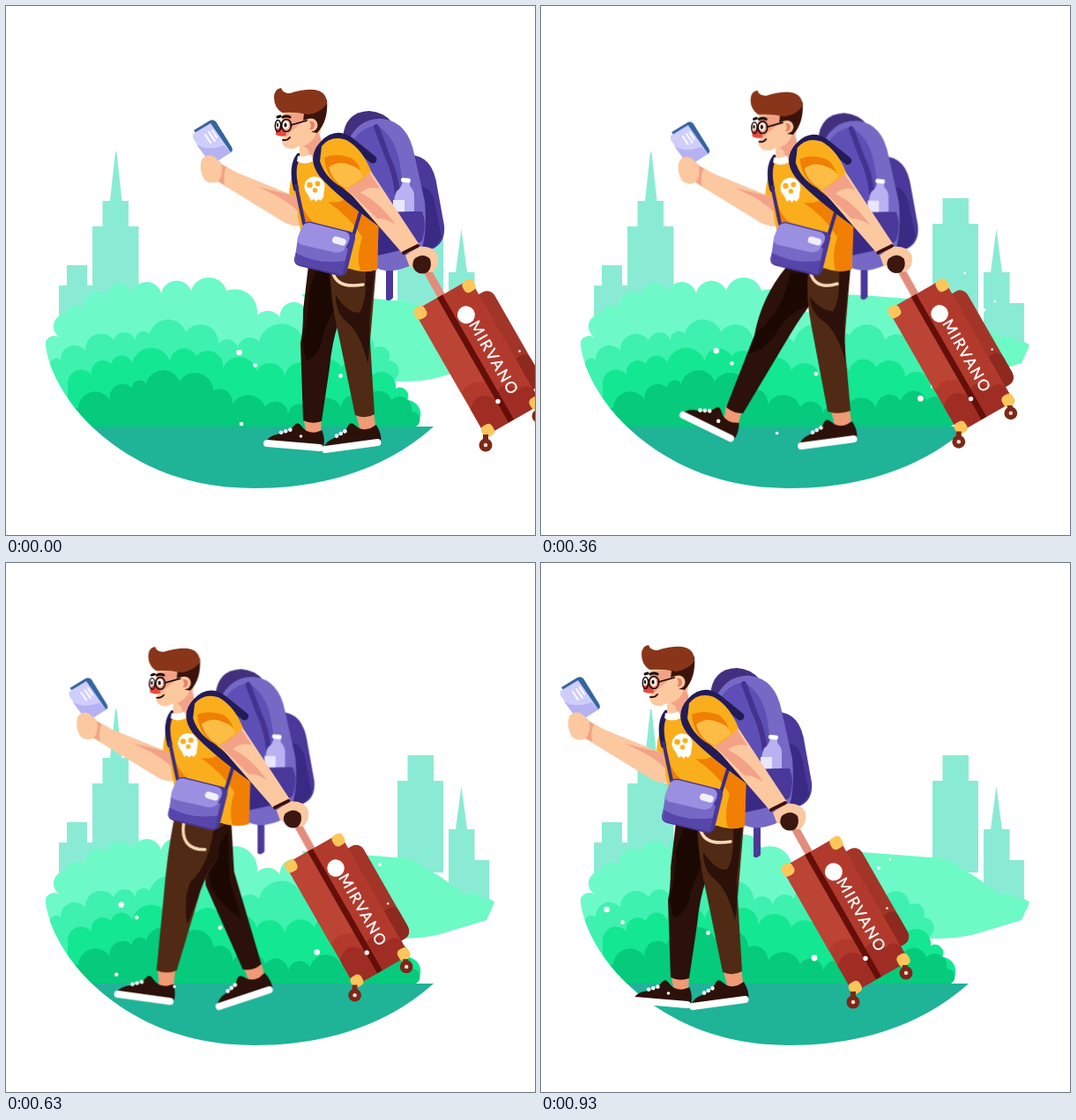
These frames come from a looping animation (600x600 px, 960 ms). An HTML page:

```html
<!DOCTYPE html>
<html lang="en">
<head>
<meta charset="utf-8">
<title>Traveller</title>
<style>
html, body { margin: 0; width: 100%; height: 100%; overflow: hidden; background: #fff; }
svg { display: block; width: 100vw; height: 100vh; }
.walker { animation: walk 960ms infinite; }
.stand, .stepB, .stepC { animation: stand 960ms step-end infinite; }
.stepB { animation-name: stepB; }
.stepC { animation-name: stepC; }
@keyframes walk {
  0% { transform: translate(0, 0) scale(1); animation-timing-function: steps(8); }
  24.999% { transform: translate(-43.8px, 0) scale(1); animation-timing-function: step-end; }
  25% { transform: translate(-39.6px, 4.3px) scale(.984); animation-timing-function: steps(8); }
  49.999% { transform: translate(-83.4px, 4.3px) scale(.984); animation-timing-function: step-end; }
  50% { transform: translate(-108.1px, 4.2px) scale(.976); animation-timing-function: steps(8); }
  74.999% { transform: translate(-151.7px, 4.2px) scale(.976); animation-timing-function: step-end; }
  75% { transform: translate(-152px, 0) scale(1); animation-timing-function: steps(8); }
  100% { transform: translate(-195.4px, 0) scale(1); }
}
@keyframes stand { 0% { visibility: visible } 25% { visibility: hidden } 75%, 100% { visibility: visible } }
@keyframes stepB { 0% { visibility: hidden } 25% { visibility: visible } 50%, 100% { visibility: hidden } }
@keyframes stepC { 0% { visibility: hidden } 50% { visibility: visible } 75%, 100% { visibility: hidden } }
.line { fill: none; stroke-linecap: round; stroke-linejoin: round; }
.skin { fill: #fbc8a0; }
.shade { fill: #f3a287; }
.ankle { fill: #f09a76; }
.brown { fill: #502a14; }
.dark { fill: #2b1109; }
.deep { fill: #1c0803; }
.indigo { fill: #4a389a; }
.violet { fill: #7669c6; }
.gold { fill: #fbae1b; }
.amber { fill: #f07f04; }
.peach { fill: #fdc65a; }
</style>
</head>
<body>
<svg viewBox="0 0 600 600">
  <defs>
    <clipPath id="bowl"><path d="M45 0V386C53 445 133 547 281 547H600V0Z"/></clipPath>
    <g id="shoe">
      <path class="dark" d="M-1 -2Q1 -9 13 -12Q24 -14 30 -24Q33 -28 38 -22Q44 -15 54 -17L61 -20Q66 -9 64 -1Z"/>
      <path class="line" d="M0 0H60" stroke="#fff" stroke-width="8"/>
      <g fill="#fff"><circle cx="15" cy="-13.5" r="2.3"/><circle cx="20" cy="-15.5" r="2.3"/><circle cx="25" cy="-17.5" r="2.3"/></g>
    </g>
    <g id="specks" fill="#fff">
      <circle cx="264.500" cy="393" r="3.300"/><circle cx="282.500" cy="407.500" r="2.300"/><circle cx="379.500" cy="419.500" r="2.400"/>
    </g>
  </defs>

  <g fill="#8aebd4">
    <path d="M60 380V317H69V294H92V317H98V250H109.500V221H118L124 166H125.500L131.500 221H139V250H150.500V380Z"/>
    <path d="M444 351V247H455.500V218H485V247H496V351Z"/>
    <path d="M502 380V302H510L516.500 253L523 302H531.500V337H548V382Z"/>
  </g>
  <path fill="#6dfac5" d="M335 327L365 328L443 334Q457 333 470 342Q482 350 493 356L522 377Q530 371 540 381Q549 379 554 385L545 405L492 421Q465 428 430 425Z"/>
  <g clip-path="url(#bowl)">
    <g id="bushes"></g>
    <path fill="#1fb398" d="M40 477H485C432 525 360 547 281 547H40Z"/>
  </g>

  <g class="walker">
    <!-- backpack -->
    <path class="indigo" d="M431 290H439V331Q435 336 431 333Z"/>
    <path fill="#42307e" d="M382 150Q384 120 412 119Q428 120 438 132L425 170Z"/>
    <path class="indigo" d="M456 169Q484 168 489 205L497 249Q499 271 480 277L455 282Z"/>
    <path fill="#392a83" d="M470 205Q482 205 486 222L494 262Q488 276 472 278Z"/>
    <path class="violet" d="M387 155Q400 126 428 128Q456 132 463 168L475 222Q480 286 455 296Q432 305 416 295L390 200Z"/>
    <path fill="#5d4fb5" d="M392 156Q400 139 420 135Q442 148 447 180L455 236L410 228Z"/>
    <path class="line" d="M420 137L432 169Q442 190 444 213" stroke="#43328f" stroke-width="6"/>
    <path fill="#b9b1f2" d="M450 198H458V204Q464 210 463 218V238H439Q439 218 443 210Q449 206 450 198Z"/>
    <path fill="#e9e7ff" d="M439 220H452V236H439Z"/>
    <rect x="448" y="195" width="11" height="5" rx="2" fill="#fff" transform="rotate(6 453 197)"/>
    <path class="indigo" d="M410 240Q420 232 472 233Q478 247 472 266Q458 277 415 284Z"/>
    <path fill="#3a2a86" d="M412 245Q440 240 446 277L415 284Z"/>

    <!-- legs -->
    <g class="stand">
      <path class="ankle" d="M337 465H358L357 487H341ZM396 460H417L420 483H402Z"/>
      <use href="#shoe" transform="translate(296 496) rotate(4.800)"/>
      <use href="#shoe" transform="translate(362 503) rotate(-7.600)"/>
      <path class="dark" d="M343 294H390L377 360Q370 380 367 410L358 471Q347 475 337 470L334 382Q337 370 337 345Z"/>
      <path class="deep" d="M352 300H385L372 345Q362 360 358 382Q350 402 340 402L336 380Q344 350 343 325Z"/>
      <path class="brown" d="M367 296H420L413 380L418 463Q408 469 396 464L377 372Q368 335 367 296Z"/>
      <path class="dark" d="M408 302L418 300L412 360Q413 390 410 405Q402 370 386 358Q374 348 374 328Q386 347 400 348Q409 340 408 302Z"/>
      <path class="line" d="M371 303Q376 321 405 316" stroke="#f8d9b6" stroke-width="3.500"/>
      <use href="#specks"/>
    </g>
    <g class="stepB" transform="scale(1.0163) translate(39.600 -4.300)">
      <path class="ankle" d="M232 452L250 458L245 477L229 471ZM350 455L372 457L375 480H356Z"/>
      <use href="#shoe" transform="translate(183 464) rotate(26)"/>
      <use href="#shoe" transform="translate(317 499) rotate(-7.700)"/>
      <path class="dark" d="M300 296H350L334 330Q318 350 306 370L251 462Q240 462 232 455L264 373Q272 330 300 296Z"/>
      <path class="deep" d="M304 303H335L326 340Q300 348 288 372Q276 390 258 394L267 370Q298 345 304 303Z"/>
      <path class="brown" d="M325 297H373L366 380L373 459Q360 464 347 460L328 360Q322 330 325 297Z"/>
      <path class="dark" d="M360 302L372 300L366 360L367 402Q358 370 343 358Q328 348 327 330Q340 346 353 346Q361 335 360 302Z"/>
      <path class="line" d="M328 304Q334 322 358 315" stroke="#f8d9b6" stroke-width="3.500"/>
    </g>
    <g class="stepB"><use href="#specks"/></g>
    <g class="stepC" transform="scale(1.0246) translate(119 -4.200)">
      <path class="ankle" d="M188 456H209L206 484L190 482ZM284 454L304 448L311 472L293 477Z"/>
      <use href="#shoe" transform="translate(143 489) rotate(7.900)"/>
      <use href="#shoe" transform="translate(258 503) rotate(-18.400)"/>
      <path class="dark" d="M235 296H272L275 350L306 455Q297 463 285 461L243 366Z"/>
      <path class="deep" d="M243 340L268 305L270 360L283 403Q260 390 249 366Z"/>
      <path class="brown" d="M207 290H264L256 335Q239 360 233 385L210 462Q199 467 187 462L195 380Q199 330 207 290Z"/>
      <path class="dark" d="M252 303L264 298L256 334Q238 360 234 380L222 410Q217 380 226 361Q245 345 252 303Z"/>
      <path class="line" d="M218 294Q213 325 242 325" stroke="#f8d9b6" stroke-width="3.500"/>
    </g>
    <g class="stepC"><use href="#specks" x="8"/></g>

    <!-- far arm and passport -->
    <path class="gold" d="M327 184Q321 200 321 217L334 224V190Z"/>
    <path class="skin" d="M244 179L262 189L326 215L337 222V249Q326 251 315 245L240 199Z"/>
    <path class="shade" d="M285 205L326 215L337 222V241Q326 222 285 205ZM240 177L250 183Q246 190 248 203L238 197Z"/>
    <path fill="#34649f" d="M213 141L231 130Q235 128 238 131L256 160Q258 164 255 166L236 176Z"/>
    <path fill="#cfcdfc" d="M212 145L232 133L255 166L238 177Q234 180 230 176L212 150Z"/>
    <path fill="#b5b2f2" d="M216 157Q228 165 247 158L255 166L238 177Q234 180 230 176Z"/>
    <path class="line" d="M226 146L232 155M230 143L237 153M234 141L239 149" stroke="#fff" stroke-width="2"/>
    <path class="skin" d="M222 174Q228 167 236 171L244 178Q247 190 241 199Q232 203 225 197Q218 185 222 174Z"/>

    <!-- torso -->
    <path class="gold" d="M328 175L357 161L405 190L422 245L421 299Q404 304 390 298L343 295L331 240Z"/>
    <path class="amber" d="M388 205L423 240L421 299Q409 302 402 300Q397 285 404 262Q391 240 365 222Q390 226 388 205Z"/>
    <path class="amber" d="M332 216L337 246L352 248Q338 238 332 216Z"/>
    <g fill="#fff">
      <circle cx="350" cy="205" r="11.500"/>
      <path d="M341 211L361 207L360 217L357 221L354 219L352 222L349 219L346 221L344 217Z"/>
    </g>
    <g class="gold"><circle cx="344.500" cy="203" r="3.300"/><circle cx="353.500" cy="201.500" r="3"/><circle cx="350.500" cy="209" r="2.700"/></g>
    <path class="line" d="M332 170Q323 182 329 207" stroke="#231b57" stroke-width="6"/>
    <path class="line" d="M329 204L338 247M405 224L394 260" stroke="#3a2c7d" stroke-width="4"/>

    <!-- head -->
    <path class="skin" d="M333 145L357 140Q354 158 358 167L344 177L333 171Z"/>
    <path class="shade" d="M337 159Q349 155 353 142L357 150L358 165L342 173Q347 163 337 159Z"/>
    <path fill="#fff" d="M331 170Q339 172 346 168L348 176Q338 181 330 176Z"/>
    <path class="skin" d="M315 118H350L348 145Q342 156 326 162Q315 163 313 154L315 148L307 146Q305 140 311 136Z"/>
    <path class="shade" d="M323 122H338L336 132Q325 140 319 147L312 147Q318 138 314 124Z"/>
    <path fill="#e8483f" d="M311 135Q317 140 318 147Q311 149 306 146Q305 140 311 135Z"/>
    <path fill="#3c130a" d="M338 121L364 106Q366 130 353 144L347 143L343 128L337 130Z"/>
    <path fill="#89351a" d="M304 104Q304 94 312 93Q314 99 322 99Q338 94 350 95Q364 97 364 111Q357 121 343 123Q327 120 313 121Q304 115 304 104Z"/>
    <circle class="skin" cx="346" cy="135" r="7.500"/>
    <path fill="#e87d68" d="M344 131Q350 130 350 136Q349 141 344 140Q348 136 344 131Z"/>
    <g fill="#fff"><ellipse cx="317.500" cy="135" rx="3.200" ry="4.500"/><ellipse cx="308.500" cy="135" rx="2" ry="4"/></g>
    <g class="line" stroke="#180a08">
      <ellipse cx="308.500" cy="136" rx="3.200" ry="6.500" stroke-width="1.500"/>
      <ellipse cx="318" cy="135.500" rx="5.500" ry="7" stroke-width="1.700"/>
      <path d="M323 135L341 130" stroke-width="1.800"/>
      <path d="M308 126L311 125M314 126Q318 124 322 126" stroke-width="3"/>
      <path d="M314 152Q319 153 322 149" stroke-width="1.800"/>
    </g>
    <g fill="#180a08"><ellipse cx="317" cy="135" rx="1.600" ry="2.600"/><ellipse cx="308" cy="135" rx="1.100" ry="2.300"/></g>

    <!-- shoulder bag -->
    <path class="indigo" d="M337 249Q340 243 347 245L391 256Q397 258 396 264L387 300Q385 307 377 306L333 295Q326 293 327 286Z"/>
    <path class="violet" d="M331 263L388 275L381 304L333 293Q327 291 328 284Z"/>
    <path fill="#5746aa" d="M329 280Q354 294 385 289L381 304L333 293Q327 291 329 280Z"/>
    <path fill="#9b8fe2" d="M335 252Q338 245 345 246L385 256Q392 259 389 267L384 276Q380 281 371 279L336 271Q329 269 331 262Z"/>
    <rect x="370" y="262.500" width="16" height="8" rx="4" fill="#f1effd" transform="rotate(17 378 266)"/>

    <!-- suitcase -->
    <path class="line" d="M476 297L495 331" stroke="#e28c7c" stroke-width="9"/>
    <g transform="translate(463 346) rotate(-29.800)">
      <rect x="62" y="20" width="26" height="124" rx="10" fill="#a33428"/>
      <path fill="#8e291f" d="M72 105Q86 100 88 112V134Q86 144 78 144H72Z"/>
      <rect width="73" height="163" rx="6" fill="#b23a2d"/>
      <path fill="#bb4434" d="M5 0H30V110Q12 98 0 108V6Z"/>
      <path fill="#a02d23" d="M0 128Q18 112 30 132V163H6Q0 163 0 157ZM37 126Q48 118 57 137Q67 133 73 143V163H37Z"/>
      <rect x="30" width="7" height="163" fill="#650f09"/>
      <g class="peach">
        <rect x="-2" y="-2" width="14" height="14" rx="5"/><rect x="61" y="-1" width="14" height="14" rx="5"/>
        <rect x="-2" y="152" width="14" height="14" rx="5"/><rect x="61" y="152" width="14" height="14" rx="5"/>
      </g>
      <circle cx="49" cy="33" r="10" fill="#fff"/>
      <text transform="translate(46 44) rotate(90)" font-family="Lato, sans-serif" font-size="17.500" letter-spacing="1.800" fill="#fff" stroke="#fff" stroke-width=".4">MIRVANO</text>
    </g>
    <g fill="#7d2717">
      <path d="M541 486H547V498H541ZM600 456H606V466H600Z"/>
      <circle cx="544" cy="498" r="7.500"/><circle cx="604" cy="465" r="7.500"/>
    </g>
    <g fill="#f3d9cf"><circle cx="544" cy="498" r="2.300"/><circle cx="604" cy="465" r="2.300"/></g>

    <!-- near arm -->
    <path class="line" d="M416 174L390 153Q374 142 360 157Q346 172 359 190Q377 211 425 246" stroke="#231b57" stroke-width="9"/>
    <path class="skin" d="M384 205L413 186L469 271Q459 281 450 281Z"/>
    <path class="shade" d="M384 205L411 187L424 207Q410 204 402 212Q422 221 442 248Q430 240 421 241Z"/>
    <path class="skin" d="M453 283L468 273Q484 271 490 283Q492 296 483 302Q470 302 457 294Z"/>
    <path fill="#3b1710" d="M463 287Q473 279 481 287Q484 296 478 302Q470 306 464 300Q459 294 463 287Z"/>
    <path class="line" d="M451 280L467 272" stroke="#3b0f0c" stroke-width="4"/>
    <path class="gold" d="M358 159Q369 146 386 152Q404 162 414 187Q402 200 386 208Q363 198 356 176Z"/>
    <path class="amber" d="M361 172Q373 166 391 172Q401 178 403 190L391 181Q376 175 367 183Q367 192 386 208Q363 198 361 172Z"/>
    <path fill="#fdbd45" d="M366 183Q378 174 392 181Q403 184 405 194L387 207Q371 201 366 183Z"/>

    <g fill="#fff">
      <circle cx="267" cy="474" r="2.300"/><circle cx="334.500" cy="488" r="1.800"/>
      <circle cx="500" cy="448" r="3.400"/><circle cx="558" cy="448.500" r="2.700"/><circle cx="582.500" cy="391.500" r="1.300"/>
      <circle cx="573" cy="346" r="2"/><circle cx="586" cy="336" r="1.500"/><circle cx="551" cy="303.500" r="1.500"/>
    </g>
  </g>
</svg>
<script>
// Each bush is a row of round bumps through a few cusps, back to front.
const bushes = [
  ["#6dfac8", "45 388 61 376 68 349 90 346 114 327 143 325 176 326 210 323 250 323 280 362 311 354 338 341 365 345 400 375 430 415"],
  ["#3ef1af", "50 408 62 402 90 391 122 379 147 380 163 372 204 370 241 383 263 391 287 381 337 378 350 374 390 379 418 388 434 402 440 424"],
  ["#13e792", "70 430 97 418 119 406 143 405 186 403 216 397 246 411 284 414 316 421 350 414 380 410 413 421 442 434 455 447 462 477"],
  ["#06ca7c", "76 468 82 456 118 447 143 433 159 429 197 426 235 436 255 457 294 455 320 463 345 459 380 456 408 448 437 447 460 460 465 477"]
];

const bumps = list => {
  const n = list.split(" ").map(Number);
  let d = `M${n[0]} 478V${n[1]}`;
  for (let i = 2; i < n.length; i += 2) {
    const r = Math.hypot(n[i] - n[i - 2], n[i + 1] - n[i - 1]) * 0.52;
    d += `A${r} ${r} 0 0 1 ${n[i]} ${n[i + 1]}`;
  }
  return d + "V478Z";
};

document.getElementById("bushes").innerHTML =
  bushes.map(([fill, list]) => `<path fill="${fill}" d="${bumps(list)}"/>`).join("");
</script>
</body>
</html>
```
